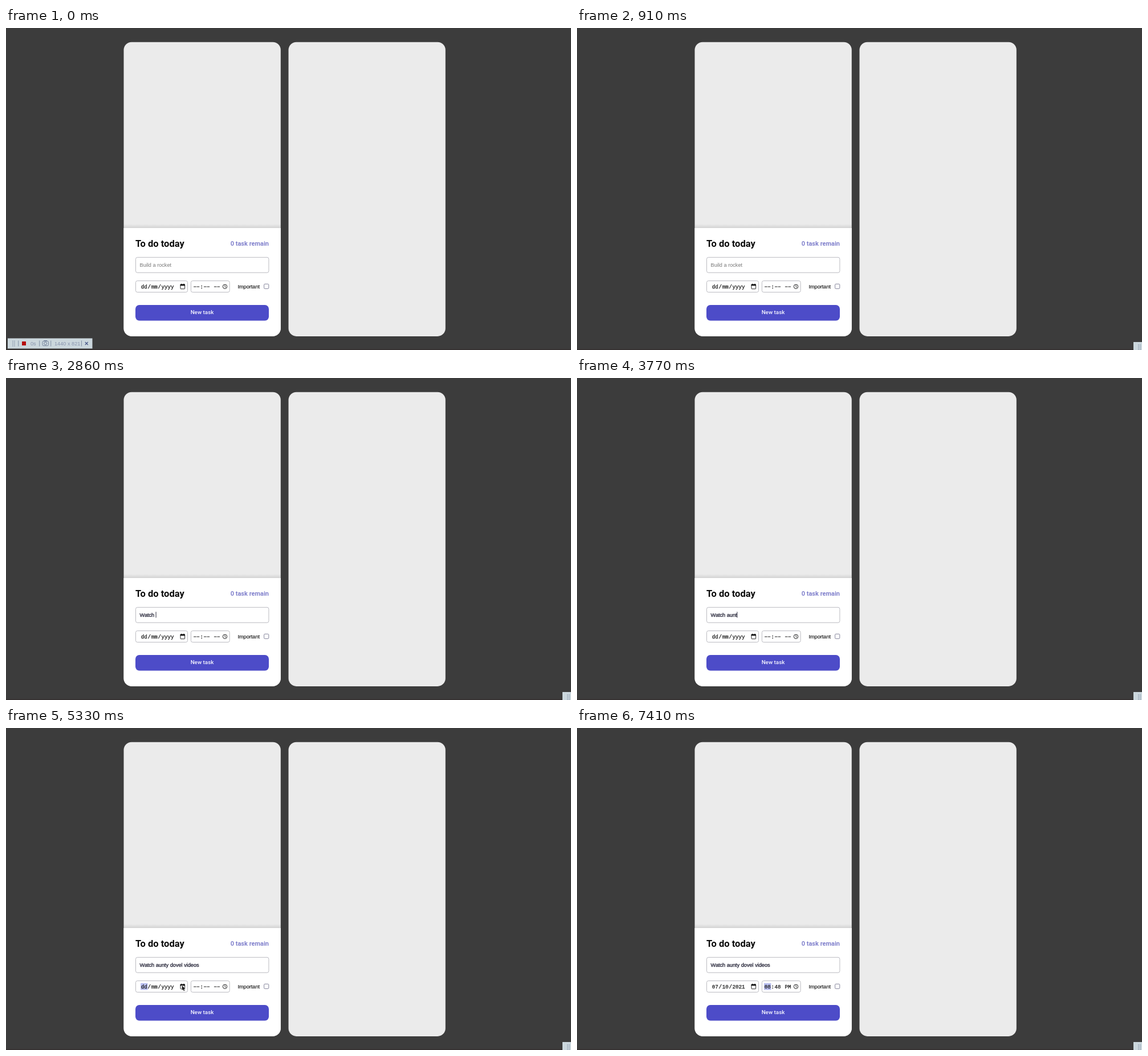
Animation, 991 px wide and 565 px high, one loop 8000 ms. Source, as an HTML page with a canvas:

```html
<!DOCTYPE html>
<html lang="en">
<head>
<meta charset="utf-8">
<title>To do today</title>
<style>
html, body { margin: 0; width: 100%; height: 100%; overflow: hidden; background: #3c3c3c; }
canvas { display: block; }
</style>
</head>
<body>
<canvas id="stage" width="991" height="565"></canvas>
<script>
const ctx = document.getElementById('stage').getContext('2d');
const LOOP = 8000, STEP = 130;
const TASK = 'Watch aunty dovel videos';
const SANS = '9.17px "Liberation Sans", Arial, sans-serif';
const MONO = '9.17px "Liberation Mono", "Courier New", monospace';
const CHAR = 5.5, PAD = 0.7;
const POINTER = new Path2D('M0 0V9L2 7.2 3.5 10.3 5 9.6 3.6 6.6 6.2 6.4Z');

// Key points are [time, value...].
const barPath = [[130, 3, 544.5], [520, 785, 490], [780, 976, 551]];
const arrowIn = [[1040, 978, 553], [1560, 807.5, 536], [1820, 290, 415]];
const arrowToDate = [[5070, 340, 430], [5330, 308.8, 452]];
const typing = [[1950, 0], [2860, 6], [3250, 6], [3770, 10], [4810, 24]];

const linear = u => u;
const smooth = u => u * u * (3 - 2 * u);

function along(path, t, ease = smooth) {
  const i = path.findIndex(p => p[0] > t);
  if (i === 0) return path[0].slice(1);
  if (i < 0) return path[path.length - 1].slice(1);
  const [from, to] = [path[i - 1], path[i]];
  const u = ease((t - from[0]) / (to[0] - from[0]));
  return from.map((v, k) => v + (to[k] - v) * u).slice(1);
}

const during = (t, from, to) => t >= from && t < to;

function box(x, y, w, h, r, fill, stroke) {
  ctx.beginPath();
  ctx.roundRect(x, y, w, h, r);
  if (fill) { ctx.fillStyle = fill; ctx.fill(); }
  if (stroke) { ctx.strokeStyle = stroke; ctx.lineWidth = 0.9; ctx.stroke(); }
}

// `weight` thickens the letters with a thin outline.
function text(s, x, y, font, color, { align = 'left', weight = 0 } = {}) {
  ctx.font = font;
  ctx.fillStyle = ctx.strokeStyle = color;
  ctx.textAlign = align;
  ctx.fillText(s, x, y);
  if (weight) {
    ctx.lineWidth = weight;
    ctx.strokeText(s, x, y);
  }
}

function line(color, width, ...points) {
  ctx.beginPath();
  for (let i = 0; i < points.length; i += 2) ctx.lineTo(points[i], points[i + 1]);
  ctx.strokeStyle = color;
  ctx.lineWidth = width;
  ctx.stroke();
}

function ring(x, y, r, color) {
  ctx.beginPath();
  ctx.arc(x, y, r, 0, 7);
  ctx.strokeStyle = color;
  ctx.lineWidth = 1;
  ctx.stroke();
}

function arrow([x, y]) {
  ctx.save();
  ctx.translate(x, y);
  ctx.scale(0.9, 0.9);
  ctx.strokeStyle = '#ddd';
  ctx.lineWidth = 1.2;
  ctx.stroke(POINTER);
  ctx.fillStyle = '#1c1c1c';
  ctx.fill(POINTER);
  ctx.restore();
}

function moveCursor(x, y) {
  ctx.save();
  ctx.translate(x, y);
  for (const [color, width] of [['#111', 3], ['#fff', 1.3]]) {
    for (let i = 0; i < 4; i++) {
      line(color, width, 0, 0, 0, -4.6);
      line(color, width, -1.8, -2.8, 0, -4.6, 1.8, -2.8);
      ctx.rotate(Math.PI / 2);
    }
  }
  ctx.restore();
}

function recorderBar([x, y], seconds) {
  ctx.save();
  ctx.translate(x, y);
  box(0, 0, 148.5, 18, 0, '#cbd7dd');
  ctx.fillStyle = '#72809a';
  for (let r = 0; r < 5; r++)
    for (let c = 0; c < 2; c++) ctx.fillRect(8.3 + c * 3, 4.2 + r * 2.2, 1.2, 1.1);
  for (const sx of [18.7, 55.7, 75.7, 129.5]) line('#8290a6', 1, sx, 4, sx, 14);
  box(25, 5.5, 7, 7, 0.5, seconds ? '#d32020' : '#b50c0c');
  text(seconds + 's', 40, 12, SANS, '#8793ad');
  box(61, 5, 10.5, 8, 2, null, '#6d7c96');
  ring(66.2, 9, 2.4, '#6d7c96');
  line('#6d7c96', 1.3, 63.5, 4.3, 69, 4.3);
  text('1440 x 821', 82, 12, SANS, '#8793ad');
  line('#4d5d8c', 1.3, 135.8, 6.5, 140.8, 11.5);
  line('#4d5d8c', 1.3, 140.8, 6.5, 135.8, 11.5);
  ctx.restore();
}

// Draws the parts of a date or time control; `active` is the highlighted part.
function fields(value, x, y, active) {
  value.split(/([\/: ])/).forEach((part, i) => {
    const pad = i % 2 ? 0 : PAD;
    const w = part.length * CHAR + pad * 2;
    if (i === active) box(x, y - 9.2, w, 12, 0, '#b9bff0');
    if (part === '--') {
      for (let k = 0; k < 2; k++) line('#333', 1.1, x + pad + k * CHAR + 0.4, y - 2.8, x + pad + k * CHAR + 5, y - 2.8);
    } else {
      text(part, x + pad, y, MONO, '#222', { weight: 0.3 });
    }
    x += w;
  });
}

function icons() {
  box(306, 450, 7.6, 7.8, 0.8, null, '#111');
  ctx.fillStyle = '#111';
  ctx.fillRect(305.6, 449.7, 8.4, 2.5);
  for (const x of [307, 311.5]) ctx.fillRect(x, 448.7, 1.1, 1.4);
  ring(384, 453.7, 3.7, '#222');
  line('#222', 0.9, 384, 451.3, 384, 454, 385.8, 455);
}

function panels() {
  ctx.fillStyle = '#3c3c3c';
  ctx.fillRect(0, 0, 991, 565);
  ctx.fillStyle = '#352f2f';
  ctx.fillRect(0, 563.5, 991, 1.5);
  for (const x of [206.5, 495.5]) box(x, 24.8, 275.3, 516.1, 13.8, '#ebebeb');
  const shade = ctx.createLinearGradient(0, 344, 0, 351);
  shade.addColorStop(0, 'rgba(0,0,0,0)');
  shade.addColorStop(1, 'rgba(0,0,0,.1)');
  ctx.fillStyle = shade;
  ctx.fillRect(206.5, 344, 275.3, 7);
  box(206.5, 351, 275.3, 189.9, [0, 0, 13.8, 13.8], '#fff');
}

function taskInput(t) {
  box(227.5, 402.4, 233.4, 26.9, 3, '#fff', '#b4b4ba');
  const typed = TASK.slice(0, Math.floor(along(typing, t, linear)[0]));
  if (typed) text(typed, 234.6, 418.6, SANS, '#17172b', { weight: 0.25 });
  else text('Build a rocket', 234.6, 418.6, SANS, '#777');
  if (during(t, 1820, 5330)) {
    const x = 234.9 + (typed && ctx.measureText(typed).width);
    line('#17172b', 0.9, x, 410.3, x, 420.5);
  }
}

function form(t) {
  text('To do today', 227, 384.2, 'bold 16.5px Roboto, sans-serif', '#0b0b0b');
  text('0 task remain', 461, 382, 'bold 11px Roboto, sans-serif', '#8080cc', { align: 'right' });
  taskInput(t);

  box(227.5, 443.6, 91, 20, 3, '#fff', '#b4b4ba');
  box(324.4, 443.6, 67.8, 20, 3, '#fff', '#b4b4ba');
  fields(t < 6110 ? 'dd/mm/yyyy' : '07/10/2021', 236.1, 456.8, during(t, 5330, 6110) ? 0 : -1);
  fields(t < 7410 ? '--:-- --' : '08:48 PM', 328, 456.8, t >= 7150 ? 0 : -1);
  icons();

  text('Important', 406.4, 456.6, SANS, '#111', { weight: 0.15 });
  box(452.6, 449.2, 8.2, 8.2, 1.6, '#fff', '#77778f');
  box(227, 486, 234, 27.5, 6.9, '#4d4cc8');
  text('New task', 344, 502.4, '500 9.8px Roboto, sans-serif', '#f4f4ff', { align: 'center' });
}

function draw(t) {
  panels();
  form(t);
  recorderBar(along(barPath, t), t < 520 ? 0 : 1);
  if (during(t, 130, 650)) moveCursor(11.5, 553.3);
  if (during(t, 1040, 1820)) arrow(along(arrowIn, t));
  if (during(t, 5070, 5590)) arrow(along(arrowToDate, t));
}

const start = performance.now();
function tick() {
  const t = (performance.now() - start) % LOOP;
  draw(Math.floor(t / STEP) * STEP);
  requestAnimationFrame(tick);
}
tick();
</script>
</body>
</html>
```
